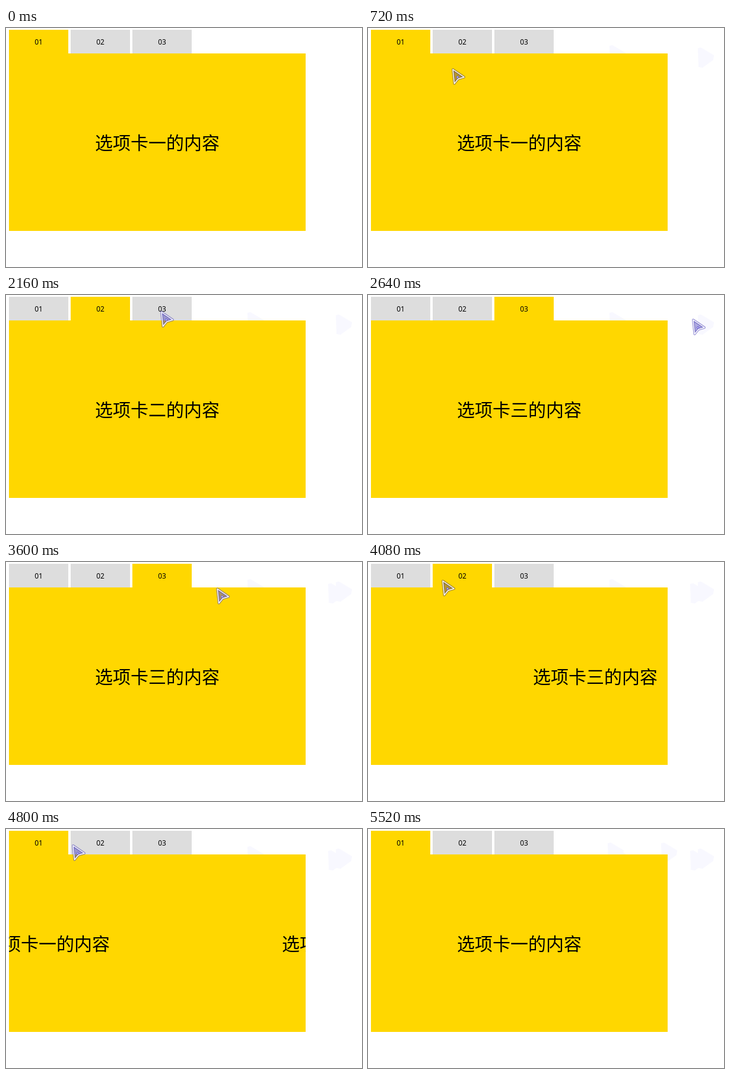
These frames come from a looping animation (600 by 404 pixels, 5880 ms). An HTML page:

```html
<!DOCTYPE html>
<html lang="zh">
<head>
<meta charset="utf-8">
<style>
html, body { margin: 0; width: 100%; height: 100%; overflow: hidden; background: #fff; }
svg { display: block; }
text { text-anchor: middle; }
#tabs text { font: 12px "Noto Sans", "Open Sans", sans-serif; }
#strip text { font: 30px "Noto Sans CJK SC", "Noto Sans CJK", sans-serif; }
#trails { fill: #f8f8ff; }
</style>
</head>
<body>
<svg width="600" height="404">
  <g id="trails"></g>
  <g id="tabs"></g>
  <svg x="5" y="43" width="500" height="300" overflow="hidden">
    <rect width="500" height="300" fill="#ffd700"/>
    <g id="strip"></g>
  </svg>
  <g id="pointer" stroke-linejoin="round">
    <path id="glow" d="M0 0L19 13L9 16L2.5 24Z" stroke-width="4" stroke-opacity=".5" fill-opacity=".45"/>
    <path d="M0 0L19 13L9 16L2.5 24Z" fill="none" stroke="#fff" stroke-width="1.4"/>
    <circle cx="8" cy="13" r="1.6" fill="#d8d4ff" stroke="#6055d0"/>
  </g>
</svg>
<script>
const LOOP = 5880, STEP = 120, SLIDE = 400, LEAD = 64;
const $ = id => document.getElementById(id);
const clamp = x => Math.min(1, Math.max(0, x));

// Tab index and moment its slide starts; the tab lights up LEAD ms earlier
const switches = [[1, 1383], [2, 2240], [1, 4007], [0, 4654]];

// Pointer moves: start, end, x, y
const moves = [
  [240, 720, 143, 70], [840, 1080, 143, 29], [1320, 1440, 171, 76],
  [1920, 2160, 262, 29], [2400, 2640, 548, 42], [2880, 3480, 433, 50],
  [3480, 3960, 126, 32], [4560, 4680, 113, 28], [4920, 5400, 564, 26]
];

// Spots where the pointer leaves a faint mark: x, y, moment
const marks = [[556, 34, 360], [407, 30, 480], [543, 37, 2760], [404, 24, 5280], [494, 24, 5400]];

$('trails').innerHTML = marks.map(([x, y]) =>
  `<path d="M${x} ${y}l5 -1l22 13l-1 8l-18 13l-7 -1z"/>`).join('');
$('tabs').innerHTML = [0, 1, 2].map(i =>
  `<rect x="${5 + 104 * i}" y="3" width="100" height="40"/>
   <text x="${55 + 104 * i}" y="28">0${i + 1}</text>`).join('');
$('strip').innerHTML = [...'一二三'].map((n, i) =>
  `<text x="${250 + 500 * i}" y="162">选项卡${n}的内容</text>`).join('');
const tabs = $('tabs').querySelectorAll('rect');
const trails = [...$('trails').children];

// CSS "ease": cubic-bezier(.25, .1, .25, 1)
function ease(x) {
  const bezier = (a, b, u) => 3 * a * u * (1 - u) ** 2 + 3 * b * u * u * (1 - u) + u ** 3;
  let lo = 0, hi = 1;
  for (let i = 0; i < 20; i++) {
    const mid = (lo + hi) / 2;
    if (bezier(.25, .25, mid) < x) lo = mid; else hi = mid;
  }
  return bezier(.1, 1, lo);
}

function drawTabs(t) {
  let active = 0, offset = 0;
  for (const [tab, start] of switches) {
    if (t >= start - LEAD) active = tab;
    offset += (tab - offset) * ease(clamp((t - start) / SLIDE));
  }
  tabs.forEach((tab, i) => tab.setAttribute('fill', i === active ? '#ffd700' : '#ddd'));
  $('strip').setAttribute('transform', `translate(${Math.round(-500 * offset)})`);
}

function drawPointer(t) {
  let x = 557, y = 35;
  for (const [start, end, toX, toY] of moves) {
    const f = clamp((t - start) / (end - start));
    x += (toX - x) * f;
    y += (toY - y) * f;
  }
  const shown = (t >= 240 && t < 2880) || (t >= 3480 && t < 5520);
  $('pointer').style.display = shown ? '' : 'none';
  $('pointer').setAttribute('transform', `translate(${x} ${y})`);

  // The glow pulses between grey and blue
  const blue = .5 - .5 * Math.cos(2 * Math.PI * (t - 1520) / 880);
  const tint = `rgb(${95 - 35 * blue},${75 - 15 * blue},${90 + 165 * blue})`;
  $('glow').setAttribute('stroke', tint);
  $('glow').setAttribute('fill', tint);
}

function tick() {
  const t = Math.floor(performance.now() % LOOP / STEP) * STEP;
  drawTabs(t);
  drawPointer(t);
  trails.forEach((trail, i) => trail.style.display = t >= marks[i][2] ? '' : 'none');
  requestAnimationFrame(tick);
}
tick();
</script>
</body>
</html>
```
